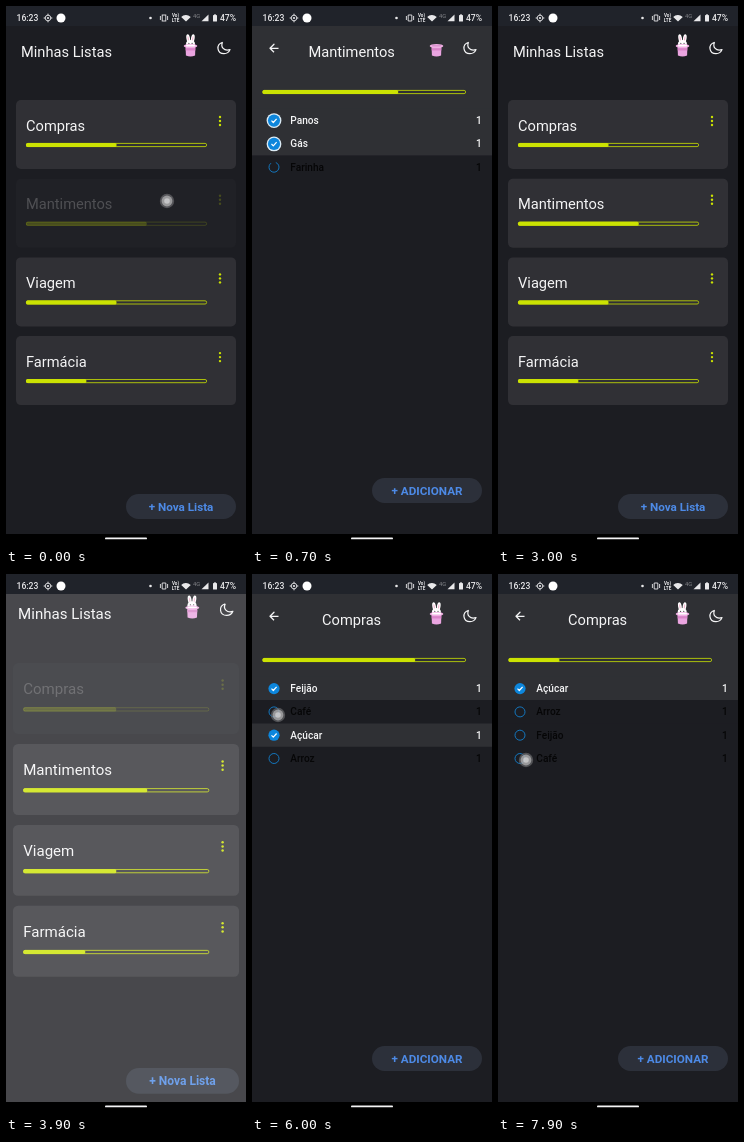
Recreate the animation shown at these times as an HTML page with a canvas. Size 240 by 540 pixels, loop 8000 ms.

```html
<!DOCTYPE html>
<html lang="pt">
<head>
<meta charset="utf-8">
<style>
html, body { margin: 0; width: 100%; height: 100%; overflow: hidden; background: #1c1d22; }
canvas { display: block; width: 240px; height: 540px; }
</style>
</head>
<body>
<canvas id="stage" width="240" height="540"></canvas>
<script>
const c = document.getElementById('stage').getContext('2d');
const LOOP = 8000, LIME = '#cbe202', BLUE = '#0d86dc', BG = '#1c1d22', PANEL = '#2f3034';
const lists = [['Compras', 1 / 2], ['Mantimentos', 2 / 3], ['Viagem', 1 / 2], ['Farmácia', 1 / 3]];

const clamp = v => Math.max(0, Math.min(1, v));
const ease = v => { v = clamp(v); return v * v * (3 - 2 * v); };
const span = (t, a, b) => ease((t - a) / (b - a));
const mix = (a, b, k) => a + (b - a) * k;

function track(keys, t) {
  const i = keys.findIndex(k => k[0] > t);
  if (i < 0) return keys[keys.length - 1][1];
  if (i === 0) return keys[0][1];
  const [a, u] = keys[i - 1], [b, v] = keys[i];
  return mix(u, v, span(t, a, b));
}

function rect(x, y, w, h, color, r = 0) {
  c.fillStyle = color;
  c.beginPath();
  c.roundRect(x, y, w, h, r);
  c.fill();
}

function disc(x, y, rx, color, ry = rx) {
  c.fillStyle = color;
  c.beginPath();
  c.ellipse(x, y, rx, ry, 0, 0, 7);
  c.fill();
}

function ring(x, y, r, color, width = 1, from = 0, to = 6.2832) {
  c.strokeStyle = color;
  c.lineWidth = width;
  c.beginPath();
  c.arc(x, y, r, from, to);
  c.stroke();
}

function line(points, color, width = 1) {
  c.strokeStyle = color;
  c.lineWidth = width;
  c.beginPath();
  points.forEach(p => c.lineTo(...p));
  c.stroke();
}

function text(s, x, y, size, color = '#f4f4f5', align = 'left', weight = 400) {
  c.font = `${weight} ${size}px Roboto, sans-serif`;
  c.textAlign = align;
  c.textBaseline = 'alphabetic';
  c.fillStyle = color;
  c.fillText(s, x, y + size * 0.355);
}

function bar(x, y, w, part) {
  c.strokeStyle = LIME;
  c.lineWidth = 0.8;
  c.beginPath();
  c.roundRect(x + 0.4, y - 1.6, w - 0.8, 3.2, 1.5);
  c.stroke();
  rect(x, y - 2, w * part, 4, LIME, 1.5);
}

function pill(label, y) {
  rect(120, y, 110, 25, '#2c303a', 12.5);
  text(label, 175, y + 12.7, 11.7, '#4d8ae6', 'center', 700);
}

function moon() {
  c.strokeStyle = '#f4f4f5';
  c.lineWidth = 1.2;
  c.lineJoin = 'round';
  c.beginPath();
  c.moveTo(216.6, 36.2);
  c.bezierCurveTo(209.5, 38.6, 211, 47.6, 218, 47.6);
  c.bezierCurveTo(221, 47.6, 223, 46.1, 224, 43.6);
  c.bezierCurveTo(218, 45.4, 214.2, 41.1, 216.6, 36.2);
  c.stroke();
}

const popUp = [[0, 1], [200, 1], [300, 0], [2400, 0], [2800, 1], [4050, 1], [4150, 0],
  [5300, 0], [5700, 1], [6300, 1], [6600, 0], [7300, 0], [7600, 1]];
const hops = [[1900, 2400], [4500, 5300], [6600, 7300]];

function hat(t) {
  const up = track(popUp, t);
  const hop = hops.find(h => t > h[0] && t < h[1]);
  const swing = hop ? Math.sin((t - hop[0]) / (hop[1] - hop[0]) * 2 * Math.PI) : 0;
  c.save();
  c.translate(184.5, 44.6);
  c.rotate(swing * 0.18);
  if (up > 0) {
    c.save();
    c.beginPath();
    c.rect(-10, -22, 20, 17);
    c.clip();
    c.translate(Math.sin(t / 160) * 0.4, (1 - up) * 17);
    for (const side of [-1, 1]) {
      c.save();
      c.translate(side * 2.3, -12.2);
      c.rotate(side * 0.16);
      disc(0, 0, 1.8, '#fff', 4.3);
      disc(0, 0.3, 0.6, '#f3b4cf', 2.7);
      c.restore();
    }
    disc(0, -6.7, 4.5, '#fff', 4);
    disc(-1.6, -7.3, 0.6, '#333');
    disc(1.6, -7.3, 0.6, '#333');
    disc(0, -5.6, 0.7, '#f08aac', 0.5);
    c.restore();
  }
  c.fillStyle = '#eaa4e0';
  c.beginPath();
  c.moveTo(-4.9, -4);
  c.lineTo(4.9, -4);
  c.lineTo(4.6, 5);
  c.quadraticCurveTo(0, 7, -4.6, 5);
  c.fill();
  rect(-4.8, -2.4, 9.6, 2.3, '#d983c8');
  disc(0, -4.6, 6.8, '#f1b0e4', 2);
  disc(0, -4.9, 4.8, up > 0.5 ? '#fff' : '#dc94d0', 0.9);
  if (swing < -0.1) {
    disc(-1, -11, 0.6, '#f4c2e4');
    disc(3, -9.5, 0.5, '#f4e19a');
    disc(-4, -8.6, 0.5, '#fff');
  }
  c.restore();
}

function listPage(t, pressed) {
  rect(0, 20, 240, 508, BG);
  text('Minhas Listas', 15, 45.4, 14.65);
  hat(t);
  moon();
  lists.forEach(([name, part], i) => {
    const y = 94 + i * 78.7;
    c.save();
    if (i === pressed) c.globalAlpha *= 0.22;
    rect(10, y, 220, 69, '#303035', 5);
    text(name, 20, y + 25.3, 14.65);
    bar(20, y + 45, 181, part);
    for (let k = 0; k < 3; k++) disc(214, y + 17 + k * 4, 1.2, LIME);
    c.restore();
  });
  pill('+ Nova Lista', 488);
}

function check(x, y, on, age) {
  const grow = age < 1 ? Math.sin(Math.PI * age) * 2.4 : 0;
  if (!on) {
    ring(x, y, 5, '#1476bd', 1, -1.2, -1.2 + 6.2832 * Math.min(1, age * 1.15));
    return;
  }
  if (grow > 0.2) disc(x, y, 5.6 + grow, '#dcebf5');
  disc(x, y, 5.6 + grow * 0.25, BLUE);
  line([[x - 2.5, y + 0.1], [x - 0.7, y + 1.9], [x + 2.6, y - 1.7]], '#fff', 1.2);
}

function detailPage(t, title, rows, done, part, age) {
  rect(0, 20, 240, 508, BG);
  rect(0, 20, 240, 83, PANEL);
  line([[26.5, 42.3], [18, 42.3], [22, 38.3], [18, 42.3], [22, 46.3]], '#f4f4f5', 1.3);
  text(title, 99.6, 45.4, 14.65, '#f4f4f5', 'center');
  hat(t);
  moon();
  bar(10.5, 86, 203.5, part);
  rows.forEach((name, i) => {
    const y = 114.6 + i * 23.3, on = done.includes(name);
    rect(0, y - 11.8, 240, 23.6, on ? PANEL : BG);
    check(22, y, on, age);
    const ink = on ? '#f4f4f5' : '#060607';
    text(name, 38.3, y, 10.1, ink, 'left', 500);
    text('1', 229.7, y, 10.1, ink, 'right', 500);
  });
  pill('+ ADICIONAR', 472);
}

// Time, order of the rows, checked rows
const shopping = [
  [0, ['Feijão', 'Açúcar', 'Arroz', 'Café'], ['Feijão', 'Açúcar']],
  [5500, ['Feijão', 'Café', 'Açúcar', 'Arroz'], ['Feijão', 'Café', 'Açúcar']],
  [6000, ['Feijão', 'Café', 'Açúcar', 'Arroz'], ['Feijão', 'Açúcar']],
  [6200, ['Feijão', 'Açúcar', 'Arroz', 'Café'], ['Feijão', 'Açúcar']],
  [6900, ['Açúcar', 'Arroz', 'Feijão', 'Café'], ['Açúcar']]
];
const shoppingBar = [[0, 0.5], [5500, 0.5], [5700, 0.75], [6050, 0.75], [6250, 0.5], [6900, 0.5], [7150, 0.25]];

function detail(t) {
  if (t < 3000) {
    detailPage(t, 'Mantimentos', ['Panos', 'Gás', 'Farinha'], ['Panos', 'Gás'], 2 / 3, clamp((t - 300) / 550));
  } else {
    const [, rows, done] = shopping.filter(s => s[0] <= t).pop();
    detailPage(t, 'Compras', rows, done, track(shoppingBar, t), clamp((t - 4000) / 550));
  }
}

function zoomed(scale, alpha, draw) {
  c.save();
  c.globalAlpha = alpha;
  c.translate(120, 270);
  c.scale(scale, scale);
  c.translate(-120, -270);
  draw();
  c.restore();
}

function opening(t, start, pressed) {
  const k = span(t, start, start + 400);
  zoomed(1 + 0.055 * k, 1, () => listPage(t, pressed));
  rect(0, 20, 240, 508, `rgba(255,255,255,${0.38 * k})`);
  const alpha = span(t, start + 200, start + 350);
  if (alpha) zoomed(mix(0.88, 1, k), alpha, () => detail(t));
}

function closing(t) {
  const k = span(t, 1500, 1980);
  zoomed(1 + 0.055 * (1 - k), 1, () => {
    listPage(t, -1);
    rect(0, 65.5, 240, 1, `rgba(255,255,255,${0.14 * (1 - span(t, 1700, 2100))})`);
  });
  const alpha = 1 - span(t, 1550, 1750);
  if (alpha) zoomed(1 - 0.12 * k, alpha, () => detail(t));
}

function systemBars() {
  rect(0, 0, 240, 20, '#20232a');
  const ink = '#e8e8ea';
  text('16:23', 10.5, 12, 8.6, ink, 'left', 500);
  ring(42, 12, 2.8, ink, 0.9);
  disc(42, 12, 1.1, ink);
  for (const d of [-1, 1]) {
    line([[42 + d * 2.8, 12], [42 + d * 4.3, 12]], ink);
    line([[42, 12 + d * 2.8], [42, 12 + d * 4.3]], ink);
    line([[158 + d * 3.6, 10], [158 + d * 3.6, 14]], ink, 0.9);
  }
  disc(55, 12, 4.5, '#fff');
  disc(144.5, 12, 1.3, ink);
  c.strokeRect(156.2, 9, 3.6, 6);
  text('Vo)', 169.5, 9.8, 4.6, ink, 'center', 700);
  text('LTE', 169.5, 14.2, 4.6, ink, 'center', 700);
  c.fillStyle = ink;
  c.beginPath();
  c.moveTo(180, 15.5);
  c.arc(180, 15.5, 6.5, -2.4, -0.74);
  c.fill();
  text('4G', 190.5, 10, 5.8, '#85878b', 'center');
  c.fillStyle = ink;
  c.beginPath();
  c.moveTo(195.5, 15.3);
  c.lineTo(202.5, 15.3);
  c.lineTo(202.5, 8.5);
  c.fill();
  rect(207, 9, 4, 6.6, ink, 0.6);
  rect(208.2, 8.2, 1.6, 1, ink);
  text('47%', 230, 12, 8.6, ink, 'right', 500);
  rect(0, 528, 240, 12, '#000');
  rect(99, 531.5, 42, 1.8, '#f4f4f5', 0.9);
}

const touches = [[0, 100, 161, 195], [1350, 1500, 22, 43], [3550, 3750, 150, 118],
  [5300, 5500, 24, 185], [5900, 6100, 26, 141], [6700, 6900, 25, 117], [7800, 8000, 28, 186]];

function touchDot(t) {
  for (const [a, b, x, y] of touches) {
    if (t < a || t >= b) continue;
    disc(x, y, 7.2, 'rgba(110,110,114,.65)');
    disc(x, y, 5.4, 'rgba(190,190,192,.65)');
    disc(x, y, 2.8, 'rgba(225,225,226,.6)');
  }
}

function draw(t) {
  c.clearRect(0, 0, 240, 540);
  rect(0, 0, 240, 540, BG);
  if (t < 550) opening(t, 100, 1);
  else if (t < 1500) detail(t);
  else if (t < 2100) closing(t);
  else if (t < 3700) listPage(t, t >= 3550 ? 0 : -1);
  else if (t < 4100) opening(t, 3700, 0);
  else detail(t);
  systemBars();
  touchDot(t);
}

const start = performance.now();
function frame() {
  draw((performance.now() - start) % LOOP);
  requestAnimationFrame(frame);
}
frame();
</script>
</body>
</html>
```
